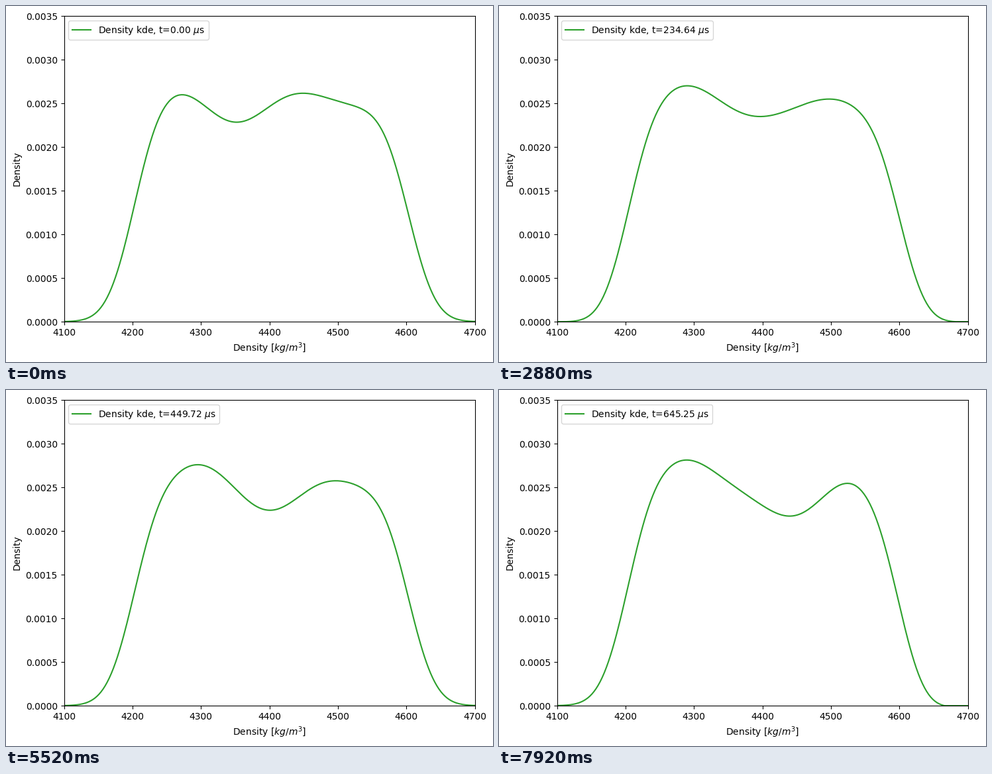
These frames come from a looping animation (735x538 px, 8 s). A matplotlib script:

```python
import numpy as np
import matplotlib.pyplot as plt
from matplotlib.animation import FuncAnimation

W, H, DPI = 735, 538, 100
TICK_MS = 40
TICKS = 200
HOLD = 3             # ticks per simulation step
STEP_US = 9.7765     # simulated time per step
MARGIN = 0.1         # inches left of the axis label

# Kernel density model: an even plateau of Gaussian kernels
BANDWIDTH = 33.0
SPACING = 36.5
PLATEAU = 2.45       # in 1e-3
centres = 4183.5 + SPACING * np.arange(13)
base = PLATEAU * ((centres > 4200) & (centres < 4600))
xs = np.linspace(4100, 4700, 400)

# Peaks, valleys and flanks (position, 1e-3 density) the plateau bends through
SHAPES = {
    0: [(4275, 2.60), (4345, 2.287), (4437, 2.608)],
    11: [(4208, 1.27), (4301, 2.64), (4377, 2.365), (4465, 2.595)],
    18: [(4269, 2.77), (4349, 2.32), (4517, 2.467)],
    29: [(4209, 1.27), (4311, 2.745), (4401, 2.357), (4503, 2.613), (4595, 1.22)],
    46: [(4300, 2.76), (4402, 2.235), (4477, 2.55)],
    58: [(4195, 1.38), (4256, 2.443), (4310, 2.33), (4407, 2.62), (4515, 2.262)],
    66: [(4286, 2.815), (4452, 2.183), (4527, 2.547), (4598, 1.22)],
}


def kernels(x):
    z = (x[:, None] - centres) / BANDWIDTH
    return np.exp(-z * z / 2) * SPACING / (BANDWIDTH * np.sqrt(2 * np.pi))


def weights(points, ridge=0.003):
    """Smallest change of the plateau that passes through the points."""
    x, y = np.array(points, float).T
    k = kernels(x)
    gram = k @ k.T + ridge * np.eye(len(x))
    return base + k.T @ np.linalg.solve(gram, y - k @ base)


steps = list(SHAPES)
shape_weights = np.array([weights(p) for p in SHAPES.values()])
basis = 1e-3 * kernels(xs)


def density(step):
    blend = [np.interp(step, steps, w) for w in shape_weights.T]
    return np.maximum(basis @ blend, 0)


def caption(step):
    return rf"Density kde, t={step * STEP_US:.2f} $\mu$s"


def place_axes(left):
    ax.set_position([left / W, 60.9 / H, 620 / W, 462 / H])


fig = plt.figure(figsize=(W / DPI, H / DPI), dpi=DPI)
ax = fig.add_subplot()
line, = ax.plot(xs, density(0), color="tab:green", lw=1.5, label=caption(0))
ax.set_xlim(4100, 4700)
ax.set_ylim(0, 0.0035)
ax.set_xlabel("Density [$kg/m^3$]")
ax.set_ylabel("Density")
label = ax.legend(loc="upper left").get_texts()[0]

# Shift the axes so the outer label sits exactly on the margin
place_axes(88)
place_axes(88 + DPI * (MARGIN - fig.get_tightbbox().x0))


def draw(tick):
    step = tick // HOLD
    line.set_ydata(density(step))
    label.set_text(caption(step))
    return line, label


anim = FuncAnimation(fig, draw, frames=TICKS, interval=TICK_MS,
                     init_func=lambda: draw(0), repeat=True, repeat_delay=0)
plt.show()
```
